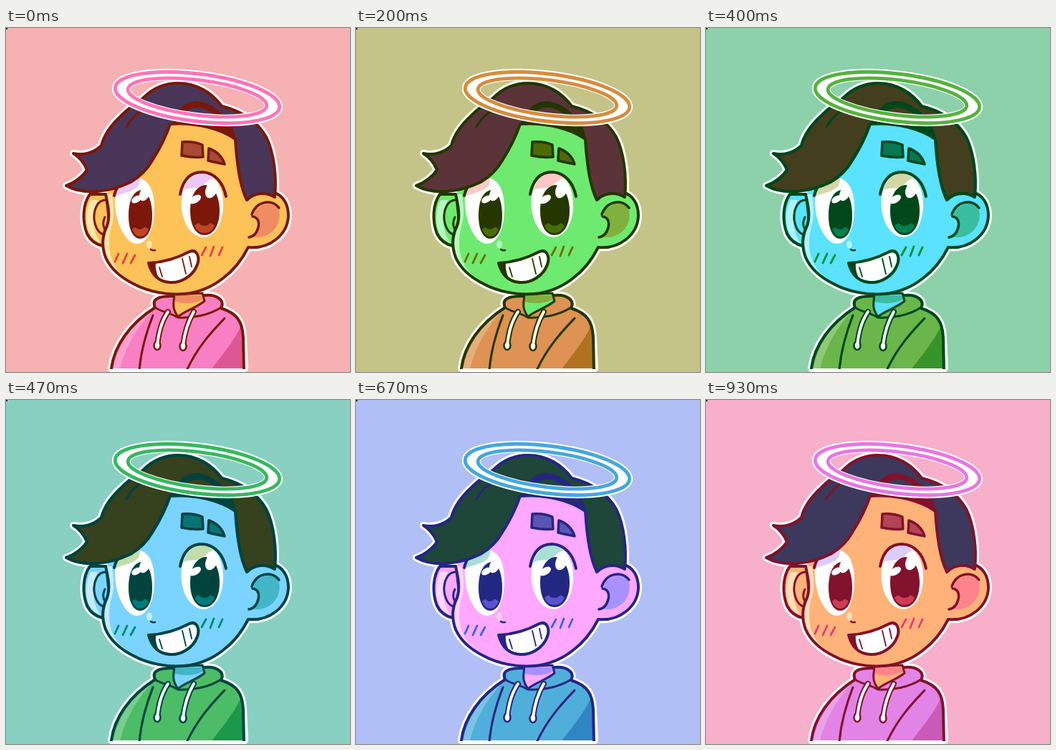
Write an HTML page that moves like this. It is 480 by 480 pixels and loops after 0.99 s.

```html
<!DOCTYPE html>
<html lang="en">
<head>
<meta charset="utf-8">
<title>Halo boy</title>
<style>
  html, body { margin: 0; width: 100%; height: 100%; overflow: hidden; }
  svg { display: block; width: 100vw; height: 100vh; }
  .ink { stroke: #7a1808; stroke-width: 4; stroke-linejoin: round; stroke-linecap: round; }
  .thin { stroke-width: 3; }
  .line { fill: none; }
  .dark { fill: #7a1808; }
  .skin { fill: #fdc258; }
  .shade { fill: #f08c64; }
  .glow { fill: #fae6ac; }
  .hair { fill: #493659; }
  .shirt { fill: #f97fc4; }
  .lid { fill: #ecc8f6; }
  .iris { fill: #7c180a; }
  .iris-low { fill: #c04528; }
  .brow { fill: #a84a34; stroke-width: 3.5; }
  .blush { fill: none; stroke: #ec3c48; stroke-width: 2.8; stroke-linecap: round; }
  .sticker { fill: #fff; stroke: #fff; stroke-width: 10; stroke-linejoin: round; }
</style>
</head>
<body>
<svg id="art" viewBox="0 0 480 480">
  <defs>
    <path id="head" d="M139 232C142 246 146 262 141 276C135 288 133 304 139 320C146 336 160 348 178 357C198 368 226 373 248 371C270 369 288 361 303 349C319 337 330 322 338 306L338 235L318 130L225 125Z"/>
    <path id="jaw" d="M139 232C142 246 146 262 141 276C135 288 133 304 139 320C146 336 160 348 178 357C198 368 226 373 248 371C270 369 288 361 303 349C319 337 330 322 338 306"/>
    <path id="earL" d="M117 232C107 246 106 269 113 287C118 297 126 302 135 304L144 270L140 232Z"/>
    <path id="earR" d="M336 240C344 230 359 226 372 229C387 233 394 246 394 262C393 289 367 309 338 306"/>
    <path id="hair" d="M84 220C96 216 107 207 113 198C109 188 102 180 94 175C108 178 123 174 133 164C137 148 148 134 161 122C173 110 183 104 192 97C206 83 222 77 240 77C266 77 287 90 301 109C330 116 352 132 363 152C374 174 378 208 375 236C361 227 345 231 336 240C327 222 322 190 320 155C300 141 265 131 229 134C223 152 214 169 204 185C196 199 186 208 174 215C145 229 109 234 84 220Z"/>
    <path id="shirt" d="M208 390C203 378 212 374 234 374L277 373C294 371 306 380 300 391C322 398 330 409 331 432L333 475H147C151 444 172 413 208 390Z"/>
    <path id="mouth" d="M199 328C222 327 241 320 256 312C266 308 271 319 267 330C261 347 243 356 229 355C211 354 203 343 199 328Z"/>
    <path id="cords" d="M226 396C216 411 213 426 211 443M262 396C253 411 249 426 247 443"/>
    <clipPath id="headClip"><use href="#head"/></clipPath>
    <clipPath id="shirtClip"><use href="#shirt"/></clipPath>
    <clipPath id="bottom"><rect width="480" height="476"/></clipPath>
    <ellipse id="ringOut" rx="115.5" ry="33"/>
    <ellipse id="ringIn" rx="97.5" ry="24.5"/>
  </defs>

  <rect width="480" height="480" fill="#f6b1b3"/>
  <rect width="2" height="2"/>

  <g class="sticker">
    <use href="#shirt"/><use href="#head"/><use href="#earL"/><use href="#earR"/><use href="#hair"/>
  </g>

  <!-- hoodie -->
  <g clip-path="url(#bottom)">
    <use href="#shirt" class="shirt"/>
    <g clip-path="url(#shirtClip)">
      <path d="M332 404C325 430 302 455 284 480H340V404Z" fill="#dc5892"/>
      <path d="M208 390C176 411 157 440 148 480H158C166 445 182 418 208 390Z" fill="#fb9fd0"/>
    </g>
    <path class="ink line" d="M147 475C151 444 172 413 208 390C203 378 212 374 234 374M277 373C294 371 306 380 300 391C322 398 330 409 331 432L332 478"/>
    <path class="ink line thin" d="M205 401C196 424 188 452 186 478M305 405C290 421 268 443 252 478"/>
    <path class="ink skin thin" d="M235 372C234 385 231 390 240 403C248 395 265 391 277 381L274 370Z"/>
    <path class="shade" d="M236 373H273L274 379C263 385 248 385 236 382Z"/>
    <path class="ink line thin" d="M207 389C214 396 228 396 240 404C260 405 283 401 300 390"/>
    <use href="#cords" class="ink line" style="stroke-width:8"/>
    <g class="ink" fill="#fff" style="stroke-width:2.5">
      <ellipse cx="211" cy="443" rx="4.5" ry="6"/>
      <ellipse cx="247" cy="444" rx="4.5" ry="6"/>
    </g>
    <use href="#cords" fill="none" stroke="#fff" stroke-width="4" stroke-linecap="round"/>
  </g>

  <!-- ears -->
  <use href="#earL" class="ink skin"/>
  <path class="glow" d="M118 240C111 254 110 272 116 286C120 294 127 299 132 300C121 285 118 262 128 240Z"/>
  <path class="ink line thin" d="M139 240C128 240 122 253 123 267C125 280 129 286 136 288M138 264C135 270 135 276 138 281"/>
  <use href="#earR" class="ink skin"/>
  <use href="#head" class="skin"/>
  <path class="shade" d="M346 258C353 245 369 241 379 249C386 264 379 282 364 289C356 293 348 293 343 290C353 284 356 273 346 264Z"/>
  <path class="ink line" d="M343 260C350 241 371 238 381 251M344 263C351 264 354 270 352 278C350 286 346 291 339 292" style="stroke-width:3.5"/>

  <!-- face -->
  <path class="glow" clip-path="url(#headClip)" d="M139 232H148C150 249 152 262 147 277C141 299 143 323 158 340C165 348 176 355 188 361L182 366C155 357 135 334 134 306C134 287 145 277 139 232Z"/>
  <use href="#jaw" class="ink line"/>

  <g id="eyeL">
    <path fill="#fff" d="M152 235C155 216 169 207 185 209C201 212 208 232 207 255C206 283 197 301 182 301C165 300 150 266 152 235Z"/>
    <path class="lid" d="M152 235C155 216 169 207 188 209L185 220C177 229 163 230 152 235Z"/>
    <path class="iris" d="M171 262C171 243 176 229 188 226C200 227 204 246 204 262C204 282 197 294 187 294C178 294 171 282 171 262Z"/>
    <path class="iris-low" d="M176 281C181 275 194 275 199 281C196 288 192 291 187 291C183 291 179 288 176 281Z"/>
    <ellipse class="iris" cx="187" cy="270" rx="9" ry="11"/>
    <ellipse cx="194" cy="230" rx="7" ry="12" fill="#fff" transform="rotate(24 194 230)"/>
    <ellipse cx="182" cy="239" rx="7.5" ry="4.5" fill="#fff" transform="rotate(-32 182 239)"/>
    <path class="ink line" d="M151 234C154 220 162 212 176 209"/>
  </g>
  <g id="eyeR">
    <path fill="#fff" d="M245 236C248 213 258 203 273 202C292 202 304 224 303 249C302 276 290 292 275 292C254 290 242 263 245 236Z"/>
    <path class="lid" d="M247 227C252 211 261 203 273 203C280 203 286 206 290 210C281 211 279 218 271 222C262 225 254 222 247 227Z"/>
    <path class="iris" d="M257 255C257 236 264 221 278 219C292 221 298 238 298 255C298 276 289 289 277 289C265 289 257 276 257 255Z"/>
    <path class="iris-low" d="M263 276C269 269 285 269 291 276C288 283 283 286 277 286C271 286 266 283 263 276Z"/>
    <ellipse class="iris" cx="277" cy="264" rx="11" ry="12"/>
    <ellipse cx="287" cy="225" rx="8" ry="13" fill="#fff" transform="rotate(24 287 225)"/>
    <ellipse cx="264" cy="239" rx="9" ry="5" fill="#fff" transform="rotate(-32 264 239)"/>
    <path class="ink line" d="M243 232C247 211 258 201 274 201C291 202 303 215 307 235"/>
  </g>

  <path class="ink brow" d="M246 159C257 158 267 160 274 163L275 180C265 181 254 180 245 178Z"/>
  <path class="ink brow" d="M283 168C294 172 302 180 305 190C297 188 289 187 282 185Z"/>

  <ellipse cx="200" cy="302" rx="4" ry="5.5" class="glow"/>
  <path class="ink line" d="M202 309Q205 311 208 310" style="stroke-width:2.5"/>
  <path class="blush" d="M157 315L152 326M169 315L163 328M180 317L174 328M279 306L273 317M290 305L285 318M302 306L297 317"/>

  <use href="#mouth" fill="#fff"/>
  <path class="dark" d="M199 328L209 328C208 337 211 346 216 353C206 348 201 340 199 328Z"/>
  <path class="ink line" d="M214 334L218 347M246 322L251 343M256 319L259 333" style="stroke-width:1.8"/>
  <use href="#mouth" class="ink line"/>

  <!-- hair -->
  <use href="#hair" class="ink hair"/>
  <path class="dark" d="M230 135C235 116 249 102 266 102C290 104 319 128 321 157C303 142 270 134 230 135Z"/>
  <path class="hair" d="M241 129C247 116 258 110 270 111C284 113 296 123 304 134C294 128 284 123 272 121C260 119 249 122 241 129Z"/>
  <path class="ink line thin" d="M168 138C173 129 180 121 191 114"/>

  <g fill="none" transform="translate(267 97) rotate(7)">
    <ellipse rx="106.5" ry="28.7" stroke="#fff" stroke-width="12"/>
    <use href="#ringOut" stroke="#fff" stroke-width="9"/>
    <use href="#ringIn" stroke="#fff" stroke-width="7"/>
    <use href="#ringOut" stroke="#ff74b8" stroke-width="4.8"/>
    <use href="#ringIn" stroke="#ff74b8" stroke-width="4.8"/>
  </g>
</svg>
<script>
  const LOOP = 990, STEPS = 15;
  const art = document.getElementById('art');
  const stepStart = k => Math.round(k * 20 / 3) * 10;
  let shown = -1;

  function draw(ms) {
    const t = ms % LOOP;
    let step = STEPS - 1;
    while (stepStart(step) > t) step--;
    if (step !== shown) {
      shown = step;
      art.style.filter = `hue-rotate(${step * 360 / STEPS}deg)`;
    }
  }

  const begin = performance.now();
  function tick() {
    draw(performance.now() - begin);
    requestAnimationFrame(tick);
  }
  tick();
</script>
</body>
</html>
```
